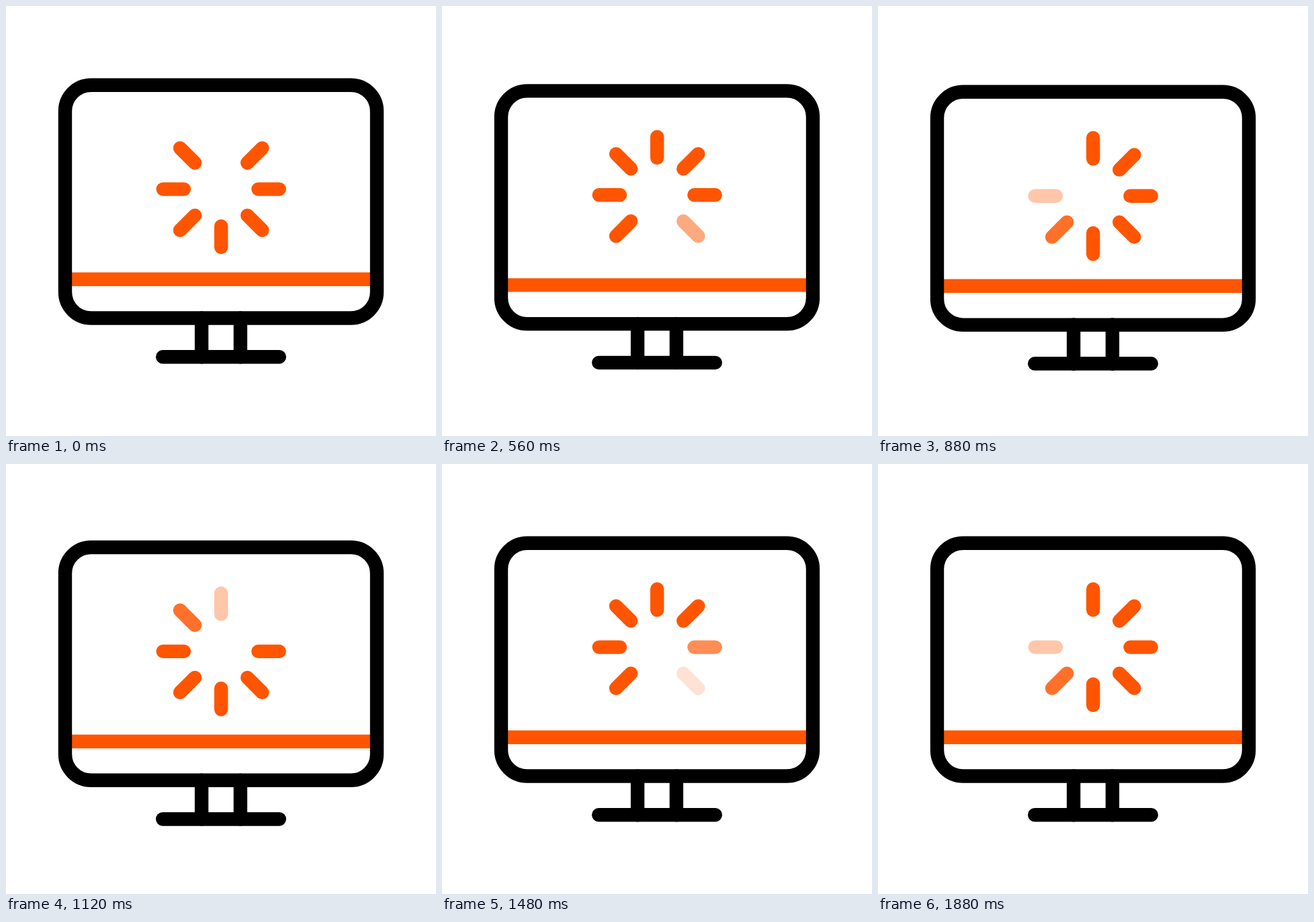
An HTML page with a canvas for the animation above (1.92 s loop, 640 by 640 pixels).

```html
<!DOCTYPE html>
<html lang="en">
<head>
<meta charset="utf-8">
<title>Loading monitor</title>
<style>
html, body { margin: 0; width: 100%; height: 100%; overflow: hidden; background: #fff; }
canvas { display: block; width: 100vmin; height: 100vmin; }
</style>
</head>
<body>
<canvas id="stage"></canvas>
<script>
const SIZE = 640, LOOP = 1920, STEP = 40;
const ORANGE = '#ff5500', BLACK = '#000';
const SPOKES = 8;

const canvas = document.getElementById('stage');
const ctx = canvas.getContext('2d');
const ratio = window.devicePixelRatio || 1;
canvas.width = canvas.height = SIZE * ratio;

const clamp = v => Math.min(1, Math.max(0, v));

function ease(t, from, to) {
  const s = clamp((t - from) / (to - from));
  return s * s * (3 - 2 * s);
}

// The screen sinks by ten pixels, rests, and rises again.
const sink = t => 10.1 * (ease(t, 250, 656) - ease(t, 950, 1355));

// Each spoke cuts out in turn, stays off for two steps, then fades in over six.
function spokeAlpha(k, t) {
  const first = k * 3;
  const second = first + (k === 0 ? 24 : 25);
  const step = Math.round(t / STEP);
  const off = step >= second ? second : first;
  return step < off ? 1 : clamp((step - off - 2) / 6);
}

function line(x1, y1, x2, y2, color, cap = 'round') {
  ctx.strokeStyle = color;
  ctx.lineCap = cap;
  ctx.beginPath();
  ctx.moveTo(x1, y1);
  ctx.lineTo(x2, y2);
  ctx.stroke();
}

function drawSpinner(t) {
  for (let k = 0; k < SPOKES; k++) {
    const alpha = spokeAlpha(k, t);
    if (!alpha) continue;
    const angle = k * Math.PI * 2 / SPOKES;
    const dx = Math.sin(angle), dy = -Math.cos(angle);
    ctx.globalAlpha = alpha;
    line(320.2 + dx * 55.2, 272.6 + dy * 55.2,
         320.2 + dx * 86.5, 272.6 + dy * 86.5, ORANGE);
  }
  ctx.globalAlpha = 1;
}

function drawMonitor() {
  line(90, 406.7, 550, 406.7, ORANGE, 'butt');
  ctx.strokeStyle = BLACK;
  ctx.beginPath();
  ctx.roundRect(88, 117.7, 464, 346.8, 38.7);
  ctx.stroke();
  for (const x of [291.1, 348.9]) line(x, 464.4, x, 522.4, BLACK);
  line(233.2, 522.2, 406.8, 522.2, BLACK);
}

function draw(now) {
  const t = Math.floor(now % LOOP / STEP) * STEP;
  ctx.setTransform(ratio, 0, 0, ratio, 0, 0);
  ctx.fillStyle = '#fff';
  ctx.fillRect(0, 0, SIZE, SIZE);
  ctx.translate(0, sink(t));
  ctx.lineWidth = 20.4;
  drawMonitor();
  drawSpinner(t);
}

let start;
function frame() {
  const now = performance.now();
  if (start === undefined) start = now;
  draw(now - start);
  requestAnimationFrame(frame);
}
draw(0);
requestAnimationFrame(frame);
</script>
</body>
</html>
```
